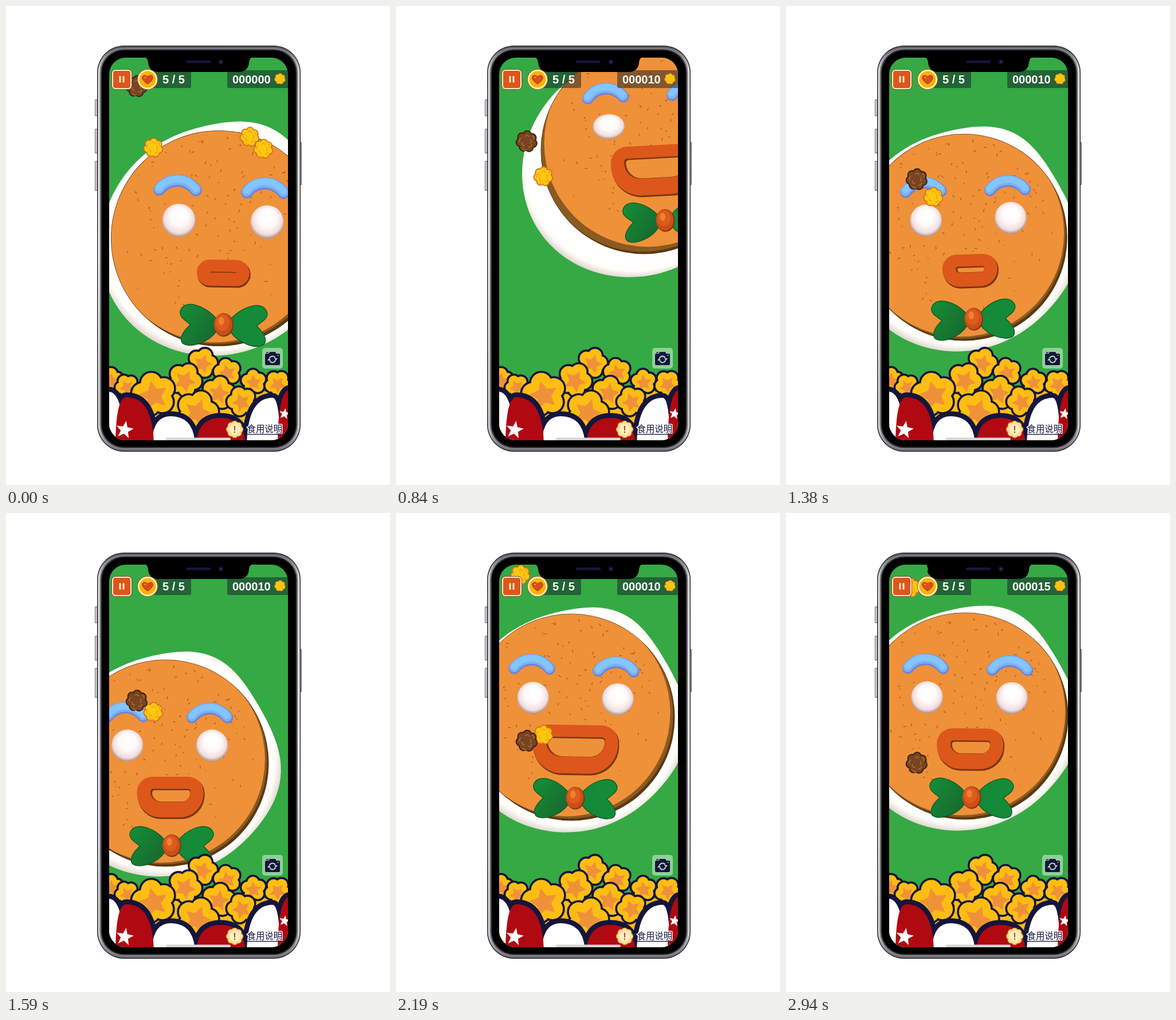
Animation, 670 px wide and 835 px high, one loop 3720 ms. Source, as an HTML page with a canvas:

```html
<!DOCTYPE html>
<html lang="zh">
<head>
<meta charset="utf-8">
<style>
  html, body { margin: 0; width: 100%; height: 100%; overflow: hidden; background: #fff; }
  canvas { display: block; }
</style>
</head>
<body>
<canvas id="stage" width="670" height="835"></canvas>
<script>
const ctx = document.getElementById('stage').getContext('2d');
const LOOP = 3720, TAU = Math.PI * 2;
const NAVY = '#15153c', GREEN = '#35a944', DOUGH = '#ef9139', YELLOW = '#ffbd12', RED = '#b00912', ORANGE = '#dd571a';
const DIGITS = '"Liberation Sans", Arial, sans-serif';

// Head pose: position, turn sideways, lift of the chin, tilt in degrees, mouth openness
const POSES = [
  { t: 0, x: 371, y: 405, yaw: 2, lift: 3, tilt: 1, open: 0 },
  { t: 450, x: 402, y: 358, yaw: 13, lift: 14, tilt: -3, open: 1.05 },
  { t: 840, x: 433, y: 252, yaw: 20, lift: 27, tilt: -3, open: 1.05 },
  { t: 1140, x: 366, y: 337, yaw: 7, lift: 10, tilt: -4, open: 0 },
  { t: 1590, x: 278, y: 436, yaw: 2, lift: 4, tilt: 0, open: .65 },
  { t: 2190, x: 306, y: 356, yaw: 0, lift: 7, tilt: 1, open: 1 },
  { t: 2530, x: 312, y: 354, yaw: 4, lift: 6, tilt: .5, open: .65 }
];
const KERNELS = [
  { x: 257, y: 247, eaten: 2370 },
  { x: 425, y: 228, eaten: 750 },
  { x: 449, y: 249, eaten: 690 },
  { x: 217, y: -32, eaten: Infinity }
];

let seed = 7;
const random = () => (seed = seed * 16807 % 2147483647) / 2147483647;
const SPECKS = Array.from({ length: 130 }, () => {
  const angle = random() * TAU, dist = Math.sqrt(random()) * .92;
  return { x: Math.cos(angle) * dist, y: Math.sin(angle) * dist, turn: random() * 360, size: .8 + random() * 2 };
});
const clamp = (v, low, high) => Math.max(low, Math.min(high, v));

// Smooth curve through the poses
function poseAt(t) {
  const last = POSES.length - 1;
  let i = 0;
  while (i < last - 1 && t >= POSES[i + 1].t) i++;
  const [p0, p1, p2, p3] = [i - 1, i, i + 1, i + 2].map(k => POSES[clamp(k, 0, last)]);
  const span = p2.t - p1.t, u = Math.min(1, (t - p1.t) / span), v = 1 - u;
  const pose = {};
  for (const key in p1) {
    const a = p1[key], b = p2[key];
    const leave = (b - p0[key]) / (p2.t - p0.t) * span, arrive = (p3[key] - a) / (p3.t - p1.t) * span;
    pose[key] = v * v * (1 + 2 * u) * a + u * u * (3 - 2 * u) * b + u * v * v * leave - u * u * v * arrive;
  }
  return pose;
}

function fill(color, path) { ctx.fillStyle = color; path ? ctx.fill(path) : ctx.fill(); }
function stroke(color, width, path) {
  ctx.strokeStyle = color; ctx.lineWidth = width;
  path ? ctx.stroke(path) : ctx.stroke();
}
function ellipse(x, y, rx, ry, color) {
  ctx.beginPath(); ctx.ellipse(x, y, rx, ry, 0, 0, TAU); fill(color);
}
function box(x, y, w, h, r, color) {
  ctx.beginPath(); ctx.roundRect(x, y, w, h, r); fill(color);
}
function at(x, y, scale, degrees, draw) {
  ctx.save();
  ctx.translate(x, y); ctx.rotate(degrees * TAU / 360); ctx.scale(scale, scale);
  draw();
  ctx.restore();
}
function text(value, x, y, font, color) {
  ctx.font = font; ctx.fillStyle = color; ctx.fillText(value, x, y);
}
function star(x, y, r, inner, color, turn) {
  ctx.beginPath();
  for (let i = 0; i < 10; i++) {
    const d = i % 2 ? r * inner : r, a = turn + i * TAU / 10;
    ctx.lineTo(x + d * Math.cos(a), y + d * Math.sin(a));
  }
  ctx.closePath(); fill(color);
}
function cluster(x, y, r, lobes, turn, color, edge, width) {
  const path = new Path2D(), lobe = r * (lobes > 5 ? .36 : .47);
  const add = (cx, cy, radius) => { path.moveTo(cx + radius, cy); path.arc(cx, cy, radius, 0, TAU); };
  add(x, y, r * .72);
  for (let i = 0; i < lobes; i++) {
    const a = turn + i * TAU / lobes;
    add(x + (r - lobe) * Math.cos(a), y + (r - lobe) * Math.sin(a), lobe);
  }
  stroke(edge, width * 2, path); fill(color, path);
}
// A popped kernel with a ring of small curls
function kernel(x, y, r, color, edge, curl) {
  cluster(x, y, r, 7, .3, color, edge, r * .11);
  for (let i = 0; i < 7; i++) {
    const a = i * 2.4, d = r * (.25 + i * .075);
    ctx.beginPath();
    ctx.arc(x + d * Math.cos(a), y + d * Math.sin(a), r * .2, a - 1.2, a + 1.3);
    stroke(curl, r * .1);
  }
}
const popcorn = (x, y, r = 15.8) => kernel(x, y, r, '#ffc70f', '#cf701c', '#f6a013');
const burnt = (x, y) => kernel(x, y, 17.5, '#784421', '#39200f', '#a56d35');

// Icing: a circle with three soft bulges
function plate(x, y, scale) {
  const bulge = (angle, centre, width) => {
    const d = Math.atan2(Math.sin(angle - centre), Math.cos(angle - centre));
    return Math.exp(-d * d / (width * width));
  };
  const path = new Path2D();
  for (let a = 0; a < TAU; a += .05) {
    const r = 190 + 18 * bulge(a, -1.15, .42) + 13 * bulge(a, .1, .45) + 15 * bulge(a, 2.55, .9);
    path.lineTo(r * Math.cos(a), r * Math.sin(a));
  }
  path.closePath();
  at(x, y, scale, 0, () => {
    const shade = ctx.createRadialGradient(-5, -14, 182, -5, -14, 214);
    shade.addColorStop(0, '#fff'); shade.addColorStop(.5, '#fffdf8'); shade.addColorStop(1, '#d6cec6');
    fill(shade, path);
  });
}
function disc(x, y, r, yaw, lift) {
  ellipse(x, y, r, r, '#5a3913');
  ctx.save();
  ctx.beginPath(); ctx.arc(x, y, r - .8, 0, TAU); ctx.clip();
  ellipse(x - 3, y - 4, r, r, '#8a5a20');
  const topX = x - 8 + yaw * .7, topY = y - 6 - lift * .25;
  ellipse(topX, topY, r, r, DOUGH);
  SPECKS.forEach(s => at(topX + s.x * r, topY + s.y * r, 1, s.turn, () => {
    ctx.fillStyle = '#a0581d'; ctx.fillRect(-s.size, -.6, s.size * 2, 1.2);
  }));
  ctx.restore();
}
function eye(x, squash) {
  ctx.save();
  ctx.translate(x, 0); ctx.scale(1, squash);
  const shade = ctx.createRadialGradient(1, -10, 6, 0, -2, 31);
  shade.addColorStop(0, '#fff'); shade.addColorStop(.4, '#fff9f8');
  shade.addColorStop(.8, '#f1dddc'); shade.addColorStop(1, '#a99190');
  ellipse(0, 0, 29, 29, shade);
  ctx.restore();
}
function brow(x, y) {
  at(x, y, 1, 0, () => {
    const arc = new Path2D();
    arc.arc(0, 32, 40, -2.5, -.64);
    ctx.lineCap = 'round';
    stroke('#6d83d8', 21, arc);
    ctx.translate(-.5, -1.5); stroke('#7eaef4', 17.5, arc);
    ctx.translate(0, -1.5); stroke('#82c5ff', 12, arc);
  });
}
function mouth(open) {
  const w = 46 + 57 * open * open, h = 1.5 + 33 * open, W = w + 47, H = h + 45 + 6 * open;
  const high = 23 + 6 * open, low = 23 + 28 * open, corners = [high, high, low, low];
  const hole = [5, 5, h * .75, h * .75], top = -H / 2 + 21;
  box(-W / 2 + 1, -H / 2 + 2, W, H, corners, '#7c3612');
  box(-W / 2, -H / 2, W - 1, H - 1, corners, ORANGE);
  ctx.save();
  box(-w / 2, top, w, h, hole, '#7c3612');
  ctx.clip();
  box(-w / 2 + 3, top + 2.5, w - 3.5, Math.max(0, h - 3), hole, DOUGH);
  ctx.restore();
}
function bow() {
  const wing = new Path2D('M-12 -9C-34 -34 -70 -44 -76 -21C-77 -9 -62 -4 -58 2C-66 9 -79 24 -71 34C-58 43 -26 33 -12 12Z');
  for (const side of [1, -1]) {
    ctx.save();
    ctx.scale(side, 1);
    const shade = ctx.createLinearGradient(-75, -20, -15, 20);
    shade.addColorStop(0, '#148c36'); shade.addColorStop(1, side > 0 ? '#18692f' : '#13893a');
    fill(shade, wing); stroke('#0c5c27', 1.5, wing);
    ctx.restore();
  }
  ellipse(.5, 1, 17, 20.5, '#7c3612');
  ellipse(-.5, 0, 16, 19.5, '#c94f19');
  ellipse(-2, -3, 12, 14, '#de5c1b');
  ellipse(-4, -6, 5, 7, '#f08232');
}
// Features sit at different depths, so turning shifts each by its own share
function character({ t, x, y, yaw, lift, tilt, open }) {
  const r = 180.5 + 7.5 * Math.max(0, 1 - t / 450), scale = r / 188;
  const squash = clamp(1.5 - lift * .052, .78, 1);
  plate(x + 2 - yaw * .8, y + lift, scale * 1.035);
  disc(x, y, r, yaw, lift);
  at(x + 7 + yaw * .25, y - 28 - lift * .65, scale, tilt, () => {
    brow(-80, -61); brow(73, -59);
    eye(-77, squash); eye(77, squash);
  });
  at(x + 8 + yaw * .5 - tilt * .8, y + 64 - lift * 1.1, 1, tilt, () => mouth(Math.max(0, open)));
  at(x + 9 + yaw - tilt * 2.5, y + (153 - lift) * scale, scale, tilt, bow);
}

function arch(left, peak, top, right, color) {
  const path = new Path2D(`M${left} 770Q${left} ${top} ${peak} ${top}Q${right} ${top} ${right} 770Z`);
  return { path, color };
}
function bucket() {
  const heap = [[343, 622, 25], [386, 638, 23], [312, 652, 29], [432, 655, 21], [474, 658, 22],
    [183, 652, 21], [211, 663, 20], [371, 674, 28], [411, 689, 25], [334, 707, 36], [258, 677, 38]];
  ctx.fillStyle = YELLOW; ctx.fillRect(180, 672, 312, 86);
  heap.forEach(([x, y, r], i) => {
    cluster(x, y, r, 5, i * .7, YELLOW, NAVY, 3.6);
    star(x, y + 2, r * .68, .5, DOUGH, i * .7);
  });
  ctx.fillStyle = NAVY; ctx.fillRect(180, 738, 312, 20);
  const stripes = [
    arch(150, 178, 672, 206, '#fff'), arch(254, 287, 715, 330, '#fff'), arch(420, 465, 683, 478, '#fff'),
    arch(191, 210, 682, 258, RED), arch(332, 374, 718, 418, RED), arch(474, 496, 669, 520, RED)
  ];
  ctx.lineJoin = 'round';
  stripes.forEach(s => stroke(NAVY, 17, s.path));
  stripes.forEach(s => fill(s.color, s.path));
  star(207, 739, 16, .42, '#fff', -1.4);
  star(486, 711, 10, .42, '#fff', -1.4);
}

function hud(score) {
  const strip = 'rgba(18,30,40,.5)';
  box(247, 112, 76, 31, [0, 3, 3, 0], strip);
  box(386, 112, 110, 31, [3, 0, 0, 3], strip);
  box(184, 110, 36, 36, 7, '#8d4a20');
  box(185, 111, 34, 34, 6, '#fff0d6');
  box(187, 113, 30, 30, 4, ORANGE);
  for (const x of [197.5, 203.5]) box(x, 122, 3, 11.5, 1, '#fff0d6');
  ellipse(247, 128, 18, 18, '#a9651e');
  ellipse(247, 128, 17, 17, '#fff0cf');
  ellipse(247, 128, 14.5, 14.5, '#fbb30a');
  at(247, 128, 1, 0, () => {
    const heart = new Path2D('M0 8C-14 -1 -9 -8 -5 -7Q-1 -7 0 -4Q1 -7 5 -7C9 -8 14 -1 0 8Z');
    fill('#dc4c18', heart); stroke('#933010', 1, heart);
    ellipse(-4, -3.5, 1.7, 1.5, '#f68d48');
  });
  text('5 / 5', 273, 135, 'bold 20px ' + DIGITS, '#fff');
  text(String(score).padStart(6, '0'), 395, 135, 'bold 20px ' + DIGITS, '#fff');
  popcorn(478, 127, 9);
}
function controls() {
  const pale = '#b9dfc0';
  box(447, 596, 36, 36, 5, 'rgba(255,255,255,.45)');
  box(452, 606, 26, 20, 2, NAVY);
  box(459, 603, 12, 6, 2, NAVY);
  box(454, 603.5, 4, 1.5, 0, NAVY);
  ctx.lineCap = 'butt';
  for (const half of [0, 180]) at(465, 616, 1, half, () => {
    ctx.beginPath(); ctx.arc(0, 0, 5.5, .3, 2.6); stroke(pale, 2);
    fill(pale, new Path2D('M3 -2h6l-3 4Z'));
  });
  ellipse(474.5, 609, 1, 1, pale);

  cluster(399, 738, 14, 8, 0, '#ffe29a', '#d98a2c', 1.3);
  ellipse(399, 738, 9, 9, '#fff0c2');
  text('!', 396.3, 743.5, 'bold 16px ' + DIGITS, '#b5441a');
  ctx.font = '500 15.4px "Noto Sans CJK SC", "Noto Sans CJK", sans-serif';
  ctx.strokeStyle = '#fff'; ctx.lineWidth = 3;
  ctx.strokeText('食用说明', 420.5, 743);
  text('食用说明', 420.5, 743, ctx.font, NAVY);
  ctx.fillRect(420, 746, 62, 1.3);
  box(279, 752.5, 113, 4.5, 2.2, '#d5d5d5');
}

function phoneBody() {
  const button = (x, y, h) => {
    box(x, y, 5, h, 1.5, '#66666c');
    box(x + 1, y + 1, 2.5, h - 2, 1, '#dcdce0');
  };
  button(155, 163, 29); button(155, 214, 43); button(155, 270, 52); button(511, 237, 75);
  const metal = ctx.createLinearGradient(0, 69, 0, 777);
  metal.addColorStop(0, '#55555b'); metal.addColorStop(.06, '#dedee0');
  metal.addColorStop(.5, '#fafafa'); metal.addColorStop(.94, '#d0d0d4'); metal.addColorStop(1, '#66666c');
  const layers = [[0, '#2a2a2f'], [1.5, metal], [4.5, '#85858b'], [6.5, '#2c2c31'], [8.5, '#000']];
  layers.forEach(([inset, color]) => box(159 + inset, 69 + inset, 355 - inset * 2, 708 - inset * 2, 47 - inset, color));
}
function notch() {
  fill('#000', new Path2D('M240 88Q247 90 248 98Q249 115 267 115H405Q423 115 424 98Q425 90 432 88Z'));
  box(314, 95, 43, 4.5, 2.2, '#15153c');
  ellipse(375, 97.5, 4.5, 4.5, '#10102a');
  ellipse(375, 97.5, 2, 2, '#26306e');
}

function draw(t) {
  const fallen = Math.max(0, t - 85);
  ctx.fillStyle = '#fff'; ctx.fillRect(0, 0, 670, 835);
  phoneBody();
  ctx.save();
  ctx.beginPath(); ctx.roundRect(180, 90, 312, 667, 29); ctx.clip();
  ctx.fillStyle = GREEN; ctx.fillRect(180, 90, 312, 667);
  character(poseAt(t));
  KERNELS.filter(k => t < k.eaten).forEach(k => popcorn(k.x, k.y + fallen * .0663));
  burnt(228, 140 + fallen * (.13 - fallen * 3.7e-6));
  burnt(266, 100 - .115 * (2530 - t));
  bucket();
  hud(5 * KERNELS.filter(k => t >= k.eaten).length);
  controls();
  ctx.restore();
  notch();
}

function tick() {
  const t = Math.floor(performance.now() % LOOP / 30) * 30;
  draw(t < 2940 ? Math.min(t, 2490) : 2530);
  requestAnimationFrame(tick);
}
tick();
</script>
</body>
</html>
```
